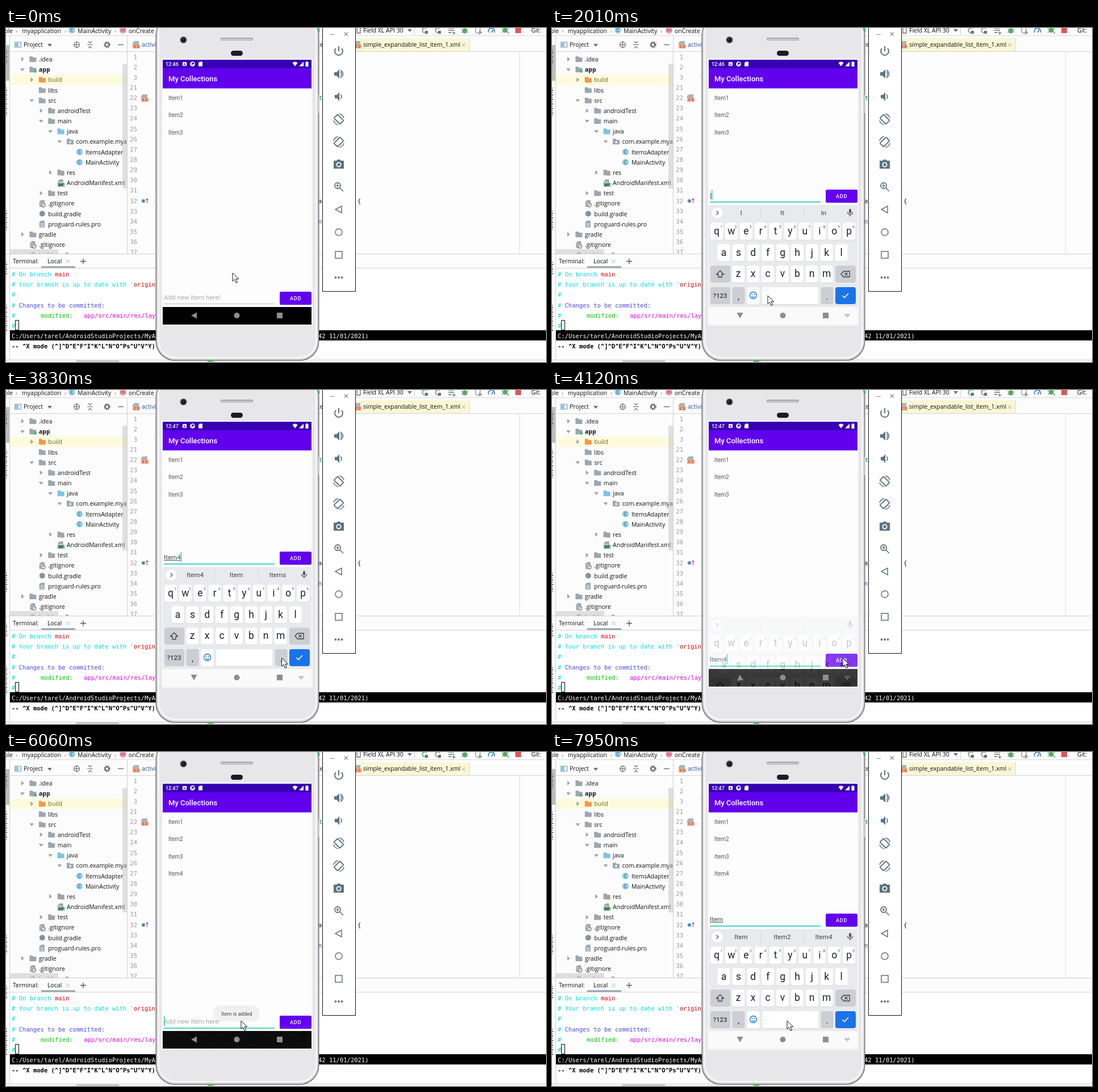
These frames come from a looping animation (951x589 px, 8000 ms). An HTML page:

```html
<!DOCTYPE html>
<html lang="en">
<head>
<meta charset="utf-8">
<title>List app in an emulator</title>
<style>
html, body { margin: 0; width: 100%; height: 100%; overflow: hidden; background: #fff; }
svg { display: block; width: 951px; height: 589px; }
text { white-space: pre; }
.ui { font-family: "Open Sans", sans-serif; font-size: 10.5px; }
.mono { font-family: "DejaVu Sans Mono", monospace; font-size: 10.5px; }
.app { font-family: Roboto, sans-serif; }
.mid { text-anchor: middle; }
.end { text-anchor: end; }
.b { font-weight: 700; }
.m { font-weight: 500; }
</style>
</head>
<body>
<svg id="stage" viewBox="0 0 951 589"></svg>
<script>
const rect = (x, y, w, h, fill, more = '') =>
  `<rect x="${x}" y="${y}" width="${w}" height="${h}" fill="${fill}" ${more}/>`;
const text = (x, y, s, cls = 'ui', fill = '#111', more = '') =>
  `<text x="${x}" y="${y}" class="${cls}" fill="${fill}" ${more}>${s}</text>`;
const path = (d, fill, more = '') => `<path d="${d}" fill="${fill}" ${more}/>`;
const line = (d, stroke, w = 1, more = '') =>
  `<path d="${d}" fill="none" stroke="${stroke}" stroke-width="${w}" ${more}/>`;
const dot = (x, y, r, fill, more = '') => `<circle cx="${x}" cy="${y}" r="${r}" fill="${fill}" ${more}/>`;
const size = n => `style="font-size:${n}px"`;
const group = (id, body, more = '') => `<g id="${id}" ${more}>${body}</g>`;
const at = (x, y, body) => `<g transform="translate(${x} ${y})">${body}</g>`;

// ---------- IDE ----------
const CHROME = '#fcfcfc';
const folder = (x, y, c = '#9aa7b0') => path(`M${x} ${y - 5}h5l1.5 2h5.5v8h-12z`, c);
const fileIcon = (x, y) => path(`M${x + 4} ${y - 6}h6v12h-9v-9z`, '#9aa7b0') +
  line(`M${x + 3} ${y - 1}h5m-5 2.5h5m-5 2.5h5`, '#f4f4f4');
const ignoreIcon = (x, y) => fileIcon(x, y) +
  dot(x + 8, y + 3, 3.5, '#fff', 'stroke="#555"') + line(`M${x + 5.5} ${y + 5.5}l5-5`, '#555');
const classIcon = (x, y) => dot(x, y, 5.8, '#8fd0ea') + text(x, y + 3, 'C', 'ui mid', '#27566b', size(8.5));
const layoutIcon = (x, y) => path(`M${x + 3} ${y - 7}h8v6h-11v-3z`, '#a9b4bc') +
  rect(x, y - 1, 13, 7, '#f4a582') + line(`M${x + 5} ${y}l-2.5 2.5 2.5 2.5m3-5l2.5 2.5-2.5 2.5`, '#7c3b1b');
const arrow = (x, y, open) => path(open ? `M${x - 4} ${y - 2}h8l-4 5z` : `M${x - 2} ${y - 4}l5 4-5 4z`, '#a3a3a3');

// depth, label, icon kind, arrow state (0 none, 1 closed, 2 open)
const tree = [
  [1, '.idea', 'dir', 1], [1, 'app', 'mod', 2], [2, 'build', 'out', 1], [2, 'libs', 'dir', 0],
  [2, 'src', 'dir', 2], [3, 'androidTest', 'dir', 1], [3, 'main', 'dir', 2], [4, 'java', 'src', 2],
  [5, 'com.example.myap', 'pkg', 2], [6, 'ItemsAdapter', 'class', 0], [6, 'MainActivity', 'class', 0],
  [4, 'res', 'res', 1], [4, 'AndroidManifest.xml', 'mf', 0], [3, 'test', 'dir', 1],
  [2, '.gitignore', 'ignore', 0], [2, 'build.gradle', 'gradle', 0], [2, 'proguard-rules.pro', 'file', 0],
  [1, 'gradle', 'dir', 1], [1, '.gitignore', 'ignore', 0], [1, 'build.gradle', 'gradle', 0]
];
const icons = {
  dir: folder,
  mod: (x, y) => folder(x, y) + dot(x + 10, y + 3, 2.5, '#4db877'),
  out: (x, y) => folder(x, y, '#f2994a'),
  src: (x, y) => folder(x, y, '#7cc4e4'),
  pkg: (x, y) => folder(x, y) + dot(x + 6, y + 1, 2, '#eee'),
  res: (x, y) => folder(x, y) + line(`M${x + 6} ${y}h6m-6 2.5h6m-6 2.5h6`, '#d39b3a'),
  class: (x, y) => classIcon(x + 6, y),
  mf: (x, y) => fileIcon(x, y) + rect(x, y, 13, 7, '#8ccb9b') + text(x + 6.5, y + 6, 'MF', 'ui mid b', '#234', size(6.5)),
  ignore: ignoreIcon,
  gradle: (x, y) => dot(x + 6, y, 5, '#84939c'),
  file: fileIcon
};

function treeRows() {
  return tree.map(([depth, label, kind, state], i) => {
    const x = 25 + depth * 16.4, y = 55 + i * 18.17;
    const row = kind === 'out' ? rect(7, y - 9, 206, 18, '#fdfbdc') : '';
    return row + (state ? arrow(x - 12.5, y, state === 2) : '') + icons[kind](x, y) +
      text(x + 16.5, y + 4, label, kind === 'mod' ? 'ui b' : 'ui', kind === 'out' ? '#6b6420' : '#111');
  }).join('');
}

function ide() {
  const nums = [1, 2, 3];
  for (let n = 21; n < 38; n++) nums.push(n);
  const term = (x, y, s, c, cls = 'mono') => text(x, y, s, cls, c);
  let s = rect(0, 0, 951, 589, CHROME) + rect(214, 42, 737, 356, '#fdfdfd');
  // Breadcrumbs and run bar
  s += text(-3, 9, 'ple') + text(17, 9, '›', 'ui', '#888') + text(28, 9, 'myapplication') +
    text(103, 9, '›', 'ui', '#888') + classIcon(116, 4) + text(126, 9, 'MainActivity') +
    text(191, 9, '›', 'ui', '#888') + dot(206, 4, 6, '#f5a3ad') + text(206, 7, 'm', 'ui mid', '#7a2433', size(9)) +
    text(216, 9, 'onCreate') + dot(547, 4, 6, '#3ddc84') +
    line('M618-2h6v11h-6z', '#6e6e6e', 1.3) + text(629, 8, 'Field XL API 30') +
    path('M707 2h8l-4 5z', '#6e6e6e') + line('M719.5 0v12', '#cfcfcf');
  for (const x of [737, 760]) s += line(`M${x + 4} 1a4.5 4.5 0 1 0 1 5`, '#59a869', 1.7) + rect(x + 1, 5, 5, 5, '#6e6e6e');
  s += line('M779 0h10m-10 4h10m-10 4h6', '#6e6e6e', 1.5) + path('M787 6l5 3-5 3z', '#59a869') +
    dot(808, 5, 4.5, '#59a869') + line('M802 2l12 6m-12 0l12-6', '#59a869') +
    line('M827 0v7q4 4 8 0v-7', '#9aa0a5', 1.5) + path('M833 4l6 4-6 4z', '#9a9a9a') +
    line('M850 8a5.5 5.5 0 1 1 10 0m-5 0l3-5', '#3b82bd', 1.7) +
    dot(879, 4, 4.3, '#59a869') + line('M873 1l12 7m-12 0l12-7m-2 6l3 3', '#59a869', 1.3) +
    rect(897, 0, 10, 9, '#e05555') + text(925, 8, 'Git:') + line('M0 13.5h951', '#dadada');
  // Project header
  s += line('M15.5 25h11v9h-11z', '#8796a0', 1.2) + rect(15, 25, 7, 9, '#8cc8e6') +
    text(31, 33, 'Project') + path('M73 28h8l-4 5z', '#6e6e6e') +
    line('M119 29.5h11m-5.5-6v12', '#6e6e6e', 1.2) + dot(124.5, 29.5, 4.8, 'none', 'stroke="#6e6e6e" stroke-width="1.2"') +
    line('M143 29.5h10m-8-6l3 3 3-3m-6 12l3-3 3 3', '#6e6e6e', 1.2) +
    dot(178, 29.5, 3.3, 'none', 'stroke="#6e6e6e" stroke-width="2.2"') +
    dot(178, 29.5, 5, 'none', 'stroke="#6e6e6e" stroke-width="1.8" stroke-dasharray="2 2"') +
    line('M197 29.5h10', '#6e6e6e', 1.4) + line('M7 41.5h944', '#d4d4d4') + line('M213.5 14v384', '#cfcfcf');
  s += `<g clip-path="url(#tree)">${treeRows()}${rect(7, 390, 85, 8, '#cfcfcf', 'opacity=".65"')}</g>` +
    rect(205, 63, 8, 220, '#bbb', 'opacity=".45"');
  // Editor
  s += layoutIcon(223, 30) + text(239, 33, 'activity', 'ui', '#254fa3') +
    text(549, 33, 'te') +
    rect(614, 18, 202, 23, '#faf6d6') + layoutIcon(613, 30) + text(629, 33, 'simple_expandable_list_item_1.xml') +
    line('M803 27l6 6m0-6l-6 6', '#aaa') + line('M816.5 18v23', '#d8d8d8') + line('M904.5 42v356', '#dedede') +
    nums.map((n, i) => text(231, 54.5 + i * 18.15, n, 'mono end', '#999')).join('') +
    layoutIcon(238, 124) + dot(242, 305, 3.5, '#7bb4d6') + dot(242, 305, 1.5, '#235a80') +
    line('M248.5 309v-8m-2 2l2-2 2 2', '#d34d4d', 1.2) + line('M260.5 84h3m-3 220h3', '#bbb') +
    text(551, 127, 't', 'mono', '#008080') + text(550, 309, 'ar', 'mono') + text(550, 345, 'n,', 'mono', '#333399') +
    text(619, 309, '{', 'mono');
  // Terminal
  s += rect(7, 424, 944, 162, '#fff') + line('M0 398.5h951M7 423.5h944', '#d0d0d0') +
    text(12, 415, 'Terminal:') + text(73, 415, 'Local') + line('M105 408l7 7m0-7l-7 7', '#b5b5b5') +
    rect(62, 420, 60, 3, '#9ca9b5') + line('M131 411.5h10m-5-5v10', '#555', 1.3) +
    term(10, 438, '# On branch', '#00dede') + term(86, 438, 'main', '#e00000') +
    term(10, 456, "# Your branch is up to date with '", '#00dede') + term(225, 456, 'origin/', '#e00000') +
    term(10, 474, '#', '#00dede') + term(10, 492.5, '#', '#00dede') + term(22.5, 492.5, 'Changes to be committed:', '#4848f0') +
    term(10, 511, '#', '#00dede') + term(61, 511, 'modified:', '#00c800') + term(137, 511, 'app/src/main/res/layo', '#e000e0') +
    term(10, 529, '#', '#00dede') + line('M16.5 515.5h6v17h-6z', '#000') + rect(7, 533, 944, 18, '#000') +
    term(10, 547, 'C:/Users/tarel/AndroidStudioProjects/MyAp', '#fff') + term(550, 547, '42 11/01/2021)', '#fff') +
    term(10, 565, '-- ^X mode (^]^D^E^F^I^K^L^N^O^Ps^U^V^Y)', '#000', 'mono b') +
    line('M0 585.5h951', '#cacaca') + rect(124, 586, 75, 3, '#cfcfcf') + rect(355, 586, 10, 3, '#62d562');
  // Side strip
  s += rect(0, 30, 6, 63, '#bdbdbd') + line('M6.5 14v572', '#d0d0d0');
  for (const [y, n] of [[38, 7], [105, 13], [322, 9], [412, 6], [488, 12]])
    for (let i = 0; i < n; i++) s += rect(0, y + i * 4, 1 + i % 2, 2, '#666');
  return s;
}

// ---------- Emulator tool window ----------
function panel() {
  const c = '#5b7380';
  const ic = (y, d, w = 1.8) => at(586, y, line(d, c, w));
  const speaker = 'M-8-3h4l5-5v16l-5-5h-4z';
  const turn = `<g transform="rotate(-45)">${rect(-4.5, -7.5, 9, 15, 'none', `rx="1" stroke="${c}" stroke-width="1.9"`)}</g>` +
    line('M-9 2q1 6 8 7.5M9-2q-1-6-8-7.5', c, 1.5);
  return rect(557.5, -2, 58, 466.5, '#fff', 'stroke="#111"') + line('M571 11.5h8m17-4l6 6m0-6l-6 6', '#7d8b93', 1.2) +
    ic(41, 'M-5-5a7 7 0 1 0 10 0M0-9v9', 2) +
    at(586, 81, path(speaker, c) + line('M3-4q4 4 0 8M3-7q9 7 0 14', c, 1.6)) +
    at(585, 121, path('M-6-3h4l4-5v16l-4-5h-4z', c) + line('M4-4q4 4 0 8', c, 1.6)) +
    at(586, 161, turn) + at(586, 201, `<g transform="scale(-1 1)">${turn}</g>`) +
    at(586, 240, path('M-9-6h5l2-2h4l2 2h5v14h-18z', c) + dot(0, 1, 4.5, '#fff') + dot(0, 1, 2.7, c)) +
    at(586, 280, dot(-2, -2, 5, 'none', `stroke="${c}" stroke-width="1.8"`) + line('M2 2l6 6M-4.5-2h5m-2.5-2.5v5', c, 1.6)) +
    ic(320, 'M5-6v12l-11-6z', 1.5) + at(586, 360, dot(0, 0, 6, 'none', `stroke="${c}" stroke-width="1.5"`)) +
    ic(400, 'M-6-6h12v12h-12z', 1.5) +
    [-5.5, 0, 5.5].map(x => dot(586 + x, 440, 1.9, c)).join('');
}

// ---------- Phone ----------
function phone() {
  return rect(263.5, -22, 288, 609, '#77777b', 'rx="34"') + rect(265, -22, 285, 607.5, '#d2d2d6', 'rx="33"') +
    rect(267, -22, 281, 605, '#f6f6f8', 'rx="31"') + rect(270, -22, 275, 602, '#e7e7ea', 'rx="28"') +
    rect(274, 54, 266, 471, '#f4f4f6') + rect(549, 118, 3, 32, '#c9c9cc') +
    dot(312.5, 21, 6, '#55565b') + dot(312.5, 21, 4, '#15161b') + dot(311.5, 20, 1.3, '#3c4960') +
    rect(378, 17, 57, 5, '#a5a5a8', 'rx="2.5"') + rect(379, 19, 55, 2, '#cfcfd2', 'rx="1"') +
    rect(396, 40, 21, 9, '#1c1c28', 'rx="4.5"');
}

const mic = (x, y) => at(x, y, rect(-2, -6, 4, 8, '#555b61', 'rx="2"') + line('M-4.5-1q0 5 4.5 5t4.5-5M0 4v3', '#555b61', 1.3));
const K = '#5a5f64';

function keyboard() {
  const key = (x, y, w, fill = '#fff') => rect(x, y - 15, w, 30, fill, 'rx="4"');
  let s = rect(276, 312, 262, 180, '#e8eaed') + rect(276, 492, 262, 200, '#fafafa');
  ['qwertyuiop', 'asdfghjkl', 'zxcvbnm'].forEach((row, r) => [...row].forEach((ch, i) => {
    const x = [290, 302.5, 328.2][r] + i * 25.9, y = 358.5 + r * 37.7;
    s += rect(x - 11, y - 14, 22, 30, '#d6d8dc', 'rx="4"') + key(x - 11, y, 22) + text(x, y + 5.5, ch, 'app mid', '#1f2124', size(17.5));
    if (!r) s += text(x + 8, y - 6, (i + 1) % 10, 'app mid', '#555', size(6.5));
  }));
  s += key(279, 434, 35, '#cbced3') + key(499, 434, 36, '#cbced3') + key(279, 472, 35, '#cbced3') +
    key(317.5, 472, 22, '#cbced3') + key(343.5, 472, 22) + rect(370, 458, 99, 30, '#d6d8dc', 'rx="4"') +
    key(370, 472, 99) + key(473.5, 472, 22, '#cbced3') + key(499, 472, 36, '#1a73e8') +
    line('M296 428l-6.5 6.5h3.5v5h6v-5h3.5z', '#3c4043', 1.3) +
    line('M509 434l4.5-5h10.5v10h-10.5zM515.5 431.5l5 5m0-5l-5 5', '#3c4043', 1.3) +
    text(296, 476, '?123', 'app mid m', '#3c4043', size(11.5)) + text(328.5, 479, ',', 'app mid', '#222', size(15)) +
    text(484.5, 479, '.', 'app mid', '#222', size(15)) +
    dot(354.5, 471.5, 6, 'none', 'stroke="#1a73e8" stroke-width="1.4"') + dot(352.3, 470, 1, '#1a73e8') + dot(356.7, 470, 1, '#1a73e8') +
    line('M351.5 473.5q3 3 6 0', '#1a73e8', 1.3) + line('M511.5 472l3.5 3.5 7-7.5', '#fff', 1.7) +
    dot(291, 326, 9.5, '#fff') + mic(525, 325);
  s += group('tools', line('M293 322.5l-3.5 3.5 3.5 3.5', K, 1.4) + dot(325, 325, 3.5, 'none', `stroke="${K}" stroke-width="1.4"`) +
    line('M327.5 327.5l4 4', K, 1.6) + line('M359.5 321.5h9.5v6l-3.5 3.5h-6zM362 327q2 2 4 0', K, 1.2) +
    dot(362.5, 324.5, 0.9, K) + dot(366, 324.5, 0.9, K) + text(402, 329.5, 'GIF', 'app mid b', K, size(9)) +
    line('M436 321.5h9v10h-9zM438 324.5h5m-5 2.5h5', K, 1.2) + rect(438, 319.5, 5, 3, K) + line('M463.5 319v14', '#d2d4d8') +
    [-4, 0, 4].map(d => dot(487 + d, 326, 1.2, K)).join(''));
  s += group('hints', line('M289.5 322.5l3.5 3.5-3.5 3.5', K, 1.4) + line('M367.5 317v18m77-18v18', '#d0d3d7') +
    [333, 405.5, 478.5].map(x => text(x, 330, '', 'app mid', '#3f4347', size(11.7))).join(''));
  return s;
}

function screen() {
  let s = rect(276, 56, 262, 467, '#fdfdfd') + rect(276, 56, 262, 15, '#3700b3') + rect(276, 71, 262, 35.5, '#6200ee') +
    text(281, 67, '', 'app m', '#fff', 'id="clock" ' + size(9)) +
    rect(311, 60, 7, 7, '#fff', 'rx="1"') + text(314.5, 66, 'A', 'app mid b', '#3700b3', size(6)) +
    dot(328.5, 63.5, 4.3, '#fff') + path('M327 61h4v3h-3v2h-1z', '#3700b3') + path('M341 59.5h5v8h-7v-6z', '#fff') +
    path('M504.5 61.5q4.5-4 9 0l-4.5 6z', '#fff') + path('M516 67.5h8v-8z', '#fff') + rect(527.5, 60, 5, 8, '#fff') + rect(529, 59, 2, 1, '#fff') +
    text(286, 94, 'My Collections', 'app m', '#fff', size(13));
  for (let i = 1; i < 5; i++) s += text(286, 96 + i * 30.6, 'Item' + i, 'app', '#555', `id="item${i}" ` + size(10));
  s += group('edit', text(278, 478.5, '', 'app', '#555', 'id="field" ' + size(11.6)) +
    rect(278, 480, 0, 1, '#555', 'id="compose"') + rect(278, 486, 195, 1, '#bbb', 'id="rule"') +
    rect(278, 466, 1.3, 17, '#03c9b5', 'id="caret"') + rect(482, 466, 56, 23, '#999', 'rx="2.5" opacity=".3"') +
    rect(482, 465, 56, 23, '#6200ee', 'rx="2.5"') + rect(482, 465, 56, 23, '#fff', 'rx="2.5" opacity=".25" id="ripple"') +
    text(510, 480, 'ADD', 'app mid m', '#fff', 'letter-spacing=".7" ' + size(9.2)));
  s += rect(276, 492, 262, 31, '#000') + group('kb', keyboard()) +
    group('toast', rect(365, 447, 82, 28, '#f0f0f0', 'rx="14"') + text(406.5, 464.5, 'Item is added', 'app mid', '#444', size(9))) +
    path('M5-5.5v11l-10-5.5z', '#8d8d8d', 'id="back"') + dot(406.5, 507, 5, '#8d8d8d') + rect(477, 502, 10, 10, '#8d8d8d') +
    group('swap', rect(515.5, 504, 9, 4, '#8d8d8d', 'opacity=".3"') + line('M516 505.5h8m-8 2h8', '#8d8d8d', 1, 'stroke-dasharray="1 1"') +
      path('M518.5 509h3l-1.5 2z', '#aaa'));
  return s;
}

const svg = document.getElementById('stage');
svg.innerHTML = '<defs><clipPath id="tree"><path d="M7 42h206v356h-206z"/></clipPath>' +
  '<clipPath id="glass"><path d="M276 56h262v467h-262z"/></clipPath></defs>' +
  ide() + panel() + phone() + `<g clip-path="url(#glass)">${screen()}</g>` +
  path('M0 0v14.5l3.4-3.1 2.6 6 2.6-1.1-2.6-5.8h4.7z', '#fff', 'id="mouse" stroke="#000" stroke-width=".9"');

const $ = id => document.getElementById(id);
const words = $('hints').querySelectorAll('text');
const show = (id, on) => $(id).setAttribute('visibility', on ? 'visible' : 'hidden');
const set = (id, name, v) => $(id).setAttribute(name, v);
const within = (t, a, b) => t >= a && t < b;

// Value of the latest key at or before t
const hold = (t, keys) => keys.reduce((v, [k, next]) => t >= k ? next : v, null);

// Pointer moves: first step, last step, number of steps, end point
const moves = [
  [150, 580, 4, 380, 472], [3320, 3850, 5, 512, 473],
  [4490, 4640, 2, 505, 482], [5490, 5910, 4, 414, 474]
];
function pointer(t) {
  let x = 399, y = 432;
  for (const [a, b, n, tx, ty] of moves) {
    if (t < a) break;
    const p = Math.min(1, (Math.floor((t - a) / (b - a) * (n - 1) + 1e-6) + 1) / n);
    x += (tx - x) * p;
    y += (ty - y) * p;
  }
  return [x, y];
}

// Keyboard: offset, opacity, back arrow angle
const off = [300, 0, 0], rise = [[170, .05, 0], [156, .14, 0], [3.5, 1, 195], [0, 1, 270]];
const slides = [
  [0, off], ...[1240, 1360, 1510, 2010].map((k, i) => [k, rise[i]]),
  [3980, [22, .85, 200]], [4120, [88, .24, 84]], [4240, off],
  ...[6060, 6340, 6490, 6610].map((k, i) => [k, rise[i]])
];
const typed = [
  [0, ''], [2010, 'I'], [2130, 'Ite'], [2250, 'Item'], [2800, 'Item4'], [4950, ''],
  [6880, 'I'], [7010, 'It'], [7150, 'Ite'], [7280, 'Item']
];
const hints = [
  [0, ''], [2010, 'I,It,In'], [2130, 'It,Ite,Item'], [2520, 'Item,Item2,Item3'], [3050, 'Item4,Item,Items'], [3980, ',,'],
  [4240, ''], [6880, 'I,It,In'], [7150, 'Ite,Item,Items'], [7420, 'Item,Item2,Item4']
];
const blink = [[720, 1240], [2010, 3050], [3320, 4490], [4640, 5490], [5910, 6340], [6880, 7950]];
const toast = [[0, 0], [5100, .6], [5220, 1], [6490, .8], [6610, .2], [6880, 0]];

function draw(t) {
  const [dy, alpha, angle] = hold(t, slides);
  const value = hold(t, typed), hint = hold(t, hints);
  const up = within(t, 1360, 3980) || t >= 6340;
  const field = $('field');

  $('clock').textContent = t < 2800 ? '12:46' : '12:47';
  show('item4', t >= 4950);
  set('edit', 'transform', `translate(0 ${up ? -180 : 0})`);
  field.textContent = value || 'Add new Item here!';
  set('field', 'fill', value ? '#444' : '#aaa');
  const w = value ? field.getComputedTextLength() : 0;
  set('compose', 'width', !up ? 0 : within(t, 2250, 2520) ? w * .42 : w);
  set('caret', 'x', 278 + w);
  show('caret', blink.some(([a, b]) => within(t, a, b)));
  set('rule', 'fill', t < 720 ? '#bbb' : '#2fd3c2');
  set('rule', 'height', t < 720 ? 1 : 1.8);
  show('ripple', within(t, 4950, 5100));

  set('kb', 'transform', `translate(0 ${dy})`);
  set('kb', 'opacity', alpha);
  set('back', 'transform', `translate(331 507) rotate(${angle})`);
  show('swap', alpha > .1);
  show('tools', !hint);
  show('hints', hint);
  hint.split(',').forEach((s, i) => { words[i].textContent = s; });
  set('toast', 'opacity', hold(t, toast));
  set('mouse', 'transform', `translate(${pointer(t).join(' ')})`);
}

const start = performance.now();
function tick() {
  draw((performance.now() - start) % 8000);
  requestAnimationFrame(tick);
}
tick();
</script>
</body>
</html>
```
